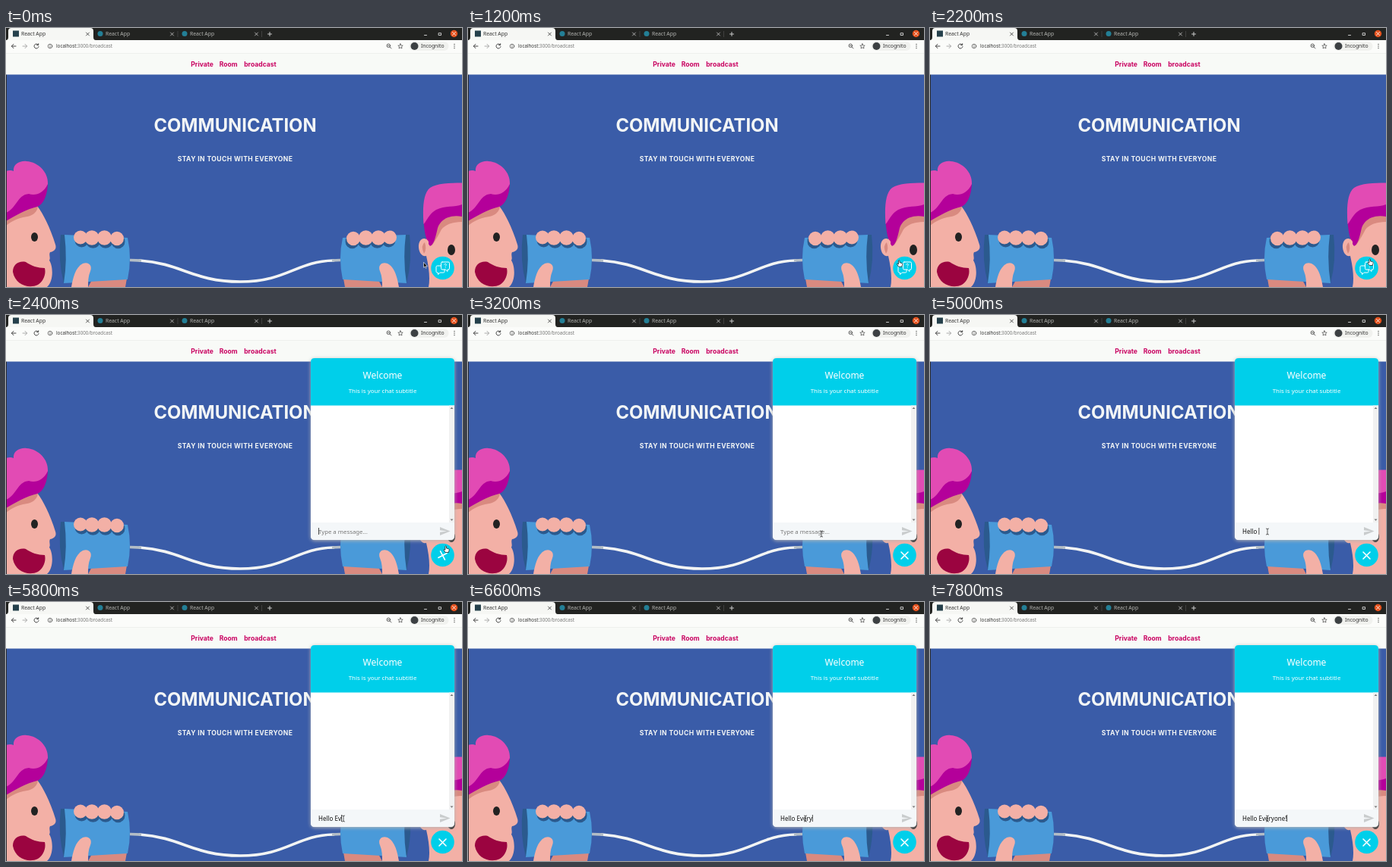
An HTML page that plays this animation: 600x342 px, repeating every 8000 ms.

```html
<!DOCTYPE html>
<html lang="en">
<head>
<meta charset="utf-8">
<title>Chat widget</title>
<style>
  html, body { margin: 0; width: 100%; height: 100%; overflow: hidden; background: #3a5ca8; }
  svg { display: block; width: 100%; height: 100%; }
  text { font-family: "Noto Sans", "Open Sans", sans-serif; white-space: pre; }
  .poppy { font-family: Inter, Roboto, sans-serif; font-weight: 700; }
  .mid { text-anchor: middle; }
  .line { fill: none; stroke-linecap: round; stroke-linejoin: round; }
  .skin { fill: #f3b0a6; }
  .shade { fill: #d98a80; }
  .pink { fill: #e24bb4; }
  .plum { fill: #b4009a; }
  .navy { fill: #2b5a8e; }
  .ink { fill: #222; }
</style>
</head>
<body>
<svg viewBox="0 0 600 342">
  <defs>
    <path id="cross" class="line" d="M-2-2 2 2M2-2-2 2"/>
    <g id="fingers">
      <ellipse cx="98" cy="276.500" rx="9" ry="9"/>
      <ellipse cx="113" cy="277" rx="9.500" ry="9.800"/>
      <ellipse cx="129.500" cy="277" rx="9.500" ry="9.800"/>
      <ellipse cx="146" cy="278" rx="9" ry="9.300"/>
    </g>
    <g id="can">
      <path class="shade" d="M108 342 114 331 159 331 157 342Z"/>
      <path class="navy" d="M72 273H79V337H76Q68 306 72 273Z"/>
      <path fill="#4a9ad9" d="M77 273 160 277Q166 304 160 332L76 337Q81 306 77 273Z"/>
      <use href="#fingers" class="navy" x="1.500" y="4"/>
      <use href="#fingers" class="skin"/>
      <path class="skin" d="M86 342C88 331 91 316 101 311 109 308 114 314 111 321 108 328 108 335 108 342Z"/>
    </g>
  </defs>

  <!-- Illustrated page -->
  <rect width="600" height="342" fill="#3a5ca8"/>
  <text class="poppy mid" x="301.5" y="137" font-size="23.800" fill="#f3f6f6">COMMUNICATION</text>
  <text class="poppy mid" x="301.5" y="176" font-size="8.600" letter-spacing=".4" fill="#f3f6f6">STAY IN TOUCH WITH EVERYONE</text>

  <path class="skin" d="M0 245 41 235C50 246 60 269 65 286 67 292 63 295 58 296 56 300 59 303 57 307 62 314 63 334 54 342H0Z"/>
  <path class="shade" d="M0 244 42 235Q41 246 28 249 12 251 0 261Z"/>
  <path class="plum" d="M0 222 55 203C55 222 48 234 41 236 27 239 12 248 0 255Z"/>
  <path class="pink" d="M0 189Q6 187 10 189C9 180 18 175 27 176 43 177 56 191 55 206 49 219 38 222 30 219 15 220 14 238 0 244Z"/>
  <ellipse class="ink" cx="37.500" cy="276" rx="4.500" ry="6"/>
  <path fill="#9b0440" d="M9 322C9 312 17 307 26 309 33 314 42 317 51 317 53 325 49 335 42 339 30 345 12 339 9 322Z"/>

  <path class="skin" d="M553 262Q570 247 600 249V342H556Q559 327 553 301Z"/>
  <path class="shade" d="M560 288 565 263Q578 246 600 246V256Q581 256 573 266 568 276 560 288Z"/>
  <path class="plum" d="M549 240 600 230V249C585 246 572 252 568 264 565 277 563 286 558 288 553 282 549 268 549 240Z"/>
  <path class="pink" d="M600 204.500C584 204.500 567 205 558 211 549 218 548 237 549.500 259 554 254 557 245 566 240 578 234 590 237 600 233Z"/>
  <path class="skin" d="M556 282C551 274 542 279 543 290 544 300 551 304 556 299Z"/>
  <path class="shade" d="M551 283Q545 287 550 298 554 292 551 283Z"/>
  <ellipse class="ink" cx="586" cy="293" rx="5" ry="7"/>

  <path class="line" stroke="#f2f4f4" stroke-width="3.700" d="M176 307C232 311 246 335 308 335S382 308 431 307"/>
  <path fill="none" stroke="#b3bdc6" stroke-width="3.700" d="M163 306.500 178 307.200M429 307 440 306.500"/>
  <use href="#can"/>
  <use href="#can" transform="translate(603) scale(-1 1)"/>

  <rect y="61" width="1" height="281" fill="#2b2d32"/>
  <rect y="33" width="600" height="28.500" fill="#f8faf7"/>
  <g font-size="8.6" fill="#c90060">
    <text class="poppy" x="243.300" y="50.500">Private</text>
    <text class="poppy" x="280.700" y="50.500">Room</text>
    <text class="poppy" x="313.200" y="50.500">broadcast</text>
  </g>

  <!-- Browser -->
  <rect width="600" height="16" fill="#222321"/>
  <path fill="#f6f7f4" d="M0 16Q3 16 3 12V4Q3 0 7 0H111Q115 0 115 4V12Q115 16 118 16Z"/>
  <rect y="16" width="600" height="17" fill="#fbfcfa"/>
  <rect y="33" width="600" height=".5" fill="#e3e5e2"/>
  <rect x="9" y="3.500" width="8" height="8" fill="#25404b"/>
  <g fill="#237f96"><circle cx="124" cy="7.500" r="3.500"/><circle cx="235" cy="7.500" r="3.500"/></g>
  <rect x="530.500" y="18" width="52" height="12" rx="6" fill="#f1f2ef"/>
  <g font-size="6.8">
    <text x="20" y="10.300" fill="#333">React App</text>
    <g fill="#b5b6b3"><text x="131" y="10.300">React App</text><text x="242" y="10.300">React App</text></g>
    <text x="546" y="26.300" fill="#333">Incognito</text>
  </g>
  <g stroke-width=".9">
    <use href="#cross" x="107.500" y="8" stroke="#444"/>
    <g stroke="#bbb"><use href="#cross" x="218.500" y="8"/><use href="#cross" x="329.500" y="8"/></g>
    <path class="line" stroke="#ddd" d="M344.500 8H349.500M347 5.500V10.500M550.500 9.500H553.500M569.500 6.700H572.500V9.500H569.500Z"/>
    <path stroke="#444" d="M226 4V12M336.500 4V12"/>
  </g>
  <circle cx="589.500" cy="7.500" r="4.700" fill="#e5531f"/>
  <use href="#cross" x="589.500" y="7.500" stroke="#fff" stroke-width=".9"/>
  <g class="line" stroke="#444" stroke-width="1">
    <path d="M13 24H7.500M10 21.300 7.300 24 10 26.700"/>
    <path stroke="#aaa" d="M22 24H27.500M25 21.300 27.700 24 25 26.700"/>
    <path d="M42.300 22A3 3 0 1 0 43 24.600M42.700 20.700V22.600H40.700"/>
    <g stroke-width=".7"><circle cx="58" cy="24" r="2.800"/><path d="M58 23.800V25.500M58 22.500V22.600"/></g>
    <g stroke-width=".8"><circle cx="503.300" cy="23.300" r="2.300"/><path d="M505 25 507 27M502.300 23.300H504.300"/></g>
    <path stroke-width=".7" d="M519 20.800 519.900 23 522.200 23.200 520.500 24.700 521 27 519 25.800 517 27 517.500 24.700 515.800 23.200 518.100 23Z"/>
    <path stroke-width="1.300" d="M590 21.500V21.600M590 24V24.100M590 26.500V26.600"/>
  </g>
  <circle cx="537.500" cy="24" r="5" fill="#3c4043"/>
  <text x="66" y="26.300" font-size="6.25" fill="#333">localhost<tspan fill="#777">:3000/broadcast</tspan></text>

  <!-- Chat panel -->
  <g id="panel">
    <rect x="401" y="57" width="189" height="240" rx="5" fill="#fff" style="filter:drop-shadow(0 1px 2.5px #b5b5b5)"/>
    <path fill="#00cfea" d="M401 119.500V62Q401 57 406 57H585Q590 57 590 62V119.500Z"/>
    <text class="mid" x="495.500" y="84" font-size="12" font-weight="500" fill="#fff">Welcome</text>
    <text class="mid" x="495.500" y="103" font-size="7.900" fill="#fff">This is your chat subtitle</text>
    <rect x="583" y="119.500" width="7" height="155" fill="#f1f1f1"/>
    <path fill="#777" d="M584.500 124 586.500 121.800 588.500 124ZM584.500 269.500 586.500 271.700 588.500 269.500Z"/>
    <path fill="#f4f7f9" d="M401 274H590V292Q590 297 585 297H406Q401 297 401 292Z"/>
    <path fill="#c9cccd" d="M571 280 584.500 285.500 571 291V286.700L580 285.500 571 284.300Z"/>
    <text id="placeholder" x="411" y="288.500" font-size="7.800" fill="#777">Type a message...</text>
    <text id="message" x="411" y="288.500" font-size="8" fill="#111"></text>
    <rect id="caret" y="281" width=".8" height="9" fill="#222"/>
  </g>

  <!-- Launcher -->
  <circle cx="574.500" cy="317" r="15.300" fill="#00cfea"/>
  <g id="bubbles" class="line" stroke="#fff" stroke-width="1">
    <path d="M574 309H582Q583.500 309 583.500 310.500V317.500Q583.500 319 582 319H581V321.500L578.300 319H574Q572.500 319 572.500 317.500V310.500Q572.500 309 574 309Z"/>
    <path d="M572.500 314H567.500Q566 314 566 315.500V321.500Q566 323 567.500 323H568.500V325.500L571.200 323H575.500Q577 323 577 321.500V319"/>
    <path stroke-width=".8" d="M576.700 312.500Q577 311.200 578.200 311.300 579.700 311.700 579.300 313L578.200 314.300V314.900M578.200 316.500V316.600"/>
  </g>
  <path id="close" class="line" stroke="#fff" stroke-width="1.600" d="M-4.500-4.500 4.500 4.500M4.500-4.500-4.500 4.500"/>

  <!-- Pointers, each with its hot spot at 0,0 -->
  <g id="pointer" stroke-linejoin="round">
    <path id="arrow" fill="#111" stroke="#fff" stroke-width=".6" d="M0 0V7L1.600 5.600 2.700 8 3.800 7.500 2.800 5.200H4.900Z"/>
    <path id="hand" fill="#fff" stroke="#111" stroke-width=".7" d="M-.8.500Q0-.5.800.500V3L3.800 3.800Q4.600 4.200 4.400 5.500L3.600 8.500H-.5L-2.800 5.200Q-2.600 4-1.500 4.700L-.8 5.300Z"/>
    <path id="beam" class="line" stroke="#333" stroke-width=".8" d="M-1.500-4Q0-4 0-3 0-4 1.500-4M0-3V3M-1.500 4Q0 4 0 3 0 4 1.500 4"/>
  </g>
</svg>

<script>
const LOOP = 8000, STEP = 200, OPEN = 2400;
const TEXT = "Hello Everyone!";
const KEY_TIMES = [3800, 4000, 4200, 4400, 4600, 5000, 5600, 5800, 6000, 6400, 6600, 6800, 7000, 7200, 7800];
const MOVES = [
  { start: 400, end: 1800, from: [549.5, 309.3], to: [578.7, 305] },
  { start: 2600, end: 3400, from: [578.7, 305], to: [444, 286] },
];
const el = id => document.getElementById(id);
const show = (id, on) => el(id).style.display = on ? "" : "none";
const ease = p => p * p * (3 - 2 * p);

function pointerAt(t) {
  const move = t < MOVES[1].start ? MOVES[0] : MOVES[1];
  const p = ease(Math.min(1, Math.max(0, (t - move.start) / (move.end - move.start))));
  return move.from.map((v, i) => v + (move.to[i] - v) * p);
}

function drawPointer(t, open) {
  const [x, y] = pointerAt(t);
  const onButton = Math.hypot(x - 574.5, y - 317) < 15.3;
  const onInput = open && x > 405 && x < 568 && y > 274 && y < 297;
  el("pointer").setAttribute("transform", `translate(${x} ${y})`);
  show("hand", onButton);
  show("beam", onInput);
  show("arrow", !onButton && !onInput);
}

function drawInput(t) {
  const typed = KEY_TIMES.filter(k => k <= t).length;
  const lastKey = typed ? KEY_TIMES[typed - 1] : OPEN;
  const message = el("message");
  message.textContent = TEXT.slice(0, typed);
  show("placeholder", !typed);
  show("caret", (t - lastKey) % 1000 < 500);
  el("caret").setAttribute("x", 411 + (typed ? message.getComputedTextLength() : 0));
}

function draw(now) {
  const t = Math.floor(now % LOOP / STEP) * STEP;
  const open = t >= OPEN;
  show("panel", open);
  show("bubbles", !open);
  show("close", open);
  el("close").setAttribute("transform", `translate(574.5 317.5) rotate(${t === OPEN ? 17 : 0})`);
  if (open) drawInput(t);
  drawPointer(t, open);
}

const begin = performance.now();
function tick() {
  draw(performance.now() - begin);
  requestAnimationFrame(tick);
}
tick();
</script>
</body>
</html>
```
